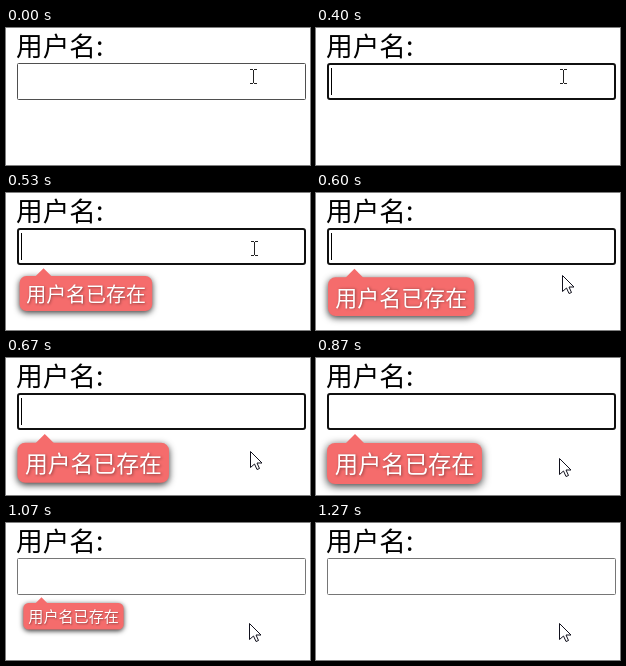
An HTML page with a canvas for the animation above (1.34 s loop, 304 by 137 pixels).

```html
<!DOCTYPE html>
<html lang="zh-CN">
<head>
<meta charset="utf-8">
<title>用户名</title>
<style>
  html, body { margin: 0; width: 100%; height: 100%; overflow: hidden; background: #fff; }
  canvas { display: block; }
</style>
</head>
<body>
<canvas id="stage" width="304" height="137"></canvas>
<script>
const ctx = document.getElementById('stage').getContext('2d');
const LOOP = 1340;
const FONT = '"Noto Sans CJK SC", "Noto Sans CJK", "Noto Sans", sans-serif';
const ORIGIN = { x: 29, y: 71 };

// Pointer stops: time, x, y; a text beam while over the field
const pointer = [
  [0, 247, 48], [530, 248, 55], [600, 246, 82],
  [670, 244, 93], [730, 243, 100]
];
// Tooltip scale during the closing transition
const closing = [[1000, 0.95], [1070, 0.647], [1130, 0.33], [1200, 0.13], [1270, 0]];

const latest = (list, t) => list.filter(k => k[0] <= t).pop();

function tipScale(t) {
  if (t >= 1000) return latest(closing, t)[1];
  if (t < 470) return 0;
  if (t >= 730) return 1;
  const step = t < 530 ? 0 : t < 600 ? 1 : t < 670 ? 2 : 3;
  return 1 - 0.37 * 0.39 ** step;
}

function label(text, x, y, size, color) {
  ctx.font = `${size}px ${FONT}`;
  ctx.fillStyle = color;
  ctx.fillText(text, x, y);
}

function roundBox(x, y, w, h, r) {
  ctx.beginPath();
  ctx.roundRect(x, y, w, h, r);
}

function shadow(color, blur, dx, dy) {
  ctx.shadowColor = color;
  ctx.shadowBlur = blur;
  ctx.shadowOffsetX = dx;
  ctx.shadowOffsetY = dy;
}

function field(focused, hovered, caret) {
  if (focused) {
    roundBox(12, 36, 287, 35, 2);
    ctx.lineWidth = 2;
    ctx.strokeStyle = '#101010';
  } else {
    roundBox(11.5, 35.5, 288, 36, 1);
    ctx.lineWidth = 1;
    ctx.strokeStyle = hovered ? '#4f4f4f' : '#767676';
  }
  ctx.stroke();
  if (caret) {
    ctx.fillStyle = '#000';
    ctx.fillRect(15, 40, 1, 27);
  }
}

function tooltip(s) {
  if (s <= 0) return;
  ctx.save();
  ctx.translate(ORIGIN.x, ORIGIN.y);
  ctx.scale(s, s);
  ctx.translate(-ORIGIN.x, -ORIGIN.y);

  ctx.fillStyle = '#f56c6c';
  shadow('rgba(0,0,0,.8)', 8 * s, 0, 2 * s);
  roundBox(11, 85, 155, 41, 8);
  ctx.fill();
  shadow('transparent', 0, 0, 0);

  ctx.beginPath();
  ctx.moveTo(29, 86);
  ctx.lineTo(39, 76);
  ctx.lineTo(49, 86);
  ctx.fill();

  shadow('rgba(0,0,0,.4)', 3 * s, s, s);
  label('用户名已存在', 18.7, 115, 23.33, '#fff');
  ctx.restore();
}

function beam(x, y) {
  ctx.fillStyle = '#222';
  ctx.fillRect(x, y - 6, 1, 13);
  ctx.fillRect(x - 3, y - 7, 3, 1);
  ctx.fillRect(x + 1, y - 7, 3, 1);
  ctx.fillRect(x - 3, y + 7, 3, 1);
  ctx.fillRect(x + 1, y + 7, 3, 1);
}

function arrow(x, y) {
  const pts = [[0, 0], [0, 16], [4, 12.5], [6.5, 18], [9, 17], [6.5, 11.5], [11.5, 11.5]];
  ctx.beginPath();
  pts.forEach(([px, py]) => ctx.lineTo(x + px + 0.5, y + py + 0.5));
  ctx.closePath();
  ctx.fillStyle = '#fff';
  ctx.fill();
  ctx.lineWidth = 1;
  ctx.strokeStyle = '#10101c';
  ctx.stroke();
}

function draw(t) {
  ctx.fillStyle = '#fff';
  ctx.fillRect(0, 0, 304, 137);
  label('用户名:', 10, 28, 26.67, '#000');

  const overField = t < 600;
  field(t >= 400 && t < 1000, overField, t >= 400 && t < 870);
  tooltip(tipScale(t));

  const [, x, y] = latest(pointer, t);
  (overField ? beam : arrow)(x, y);
}

const start = performance.now();
function tick() {
  draw((performance.now() - start) % LOOP);
  requestAnimationFrame(tick);
}
tick();
</script>
</body>
</html>
```
